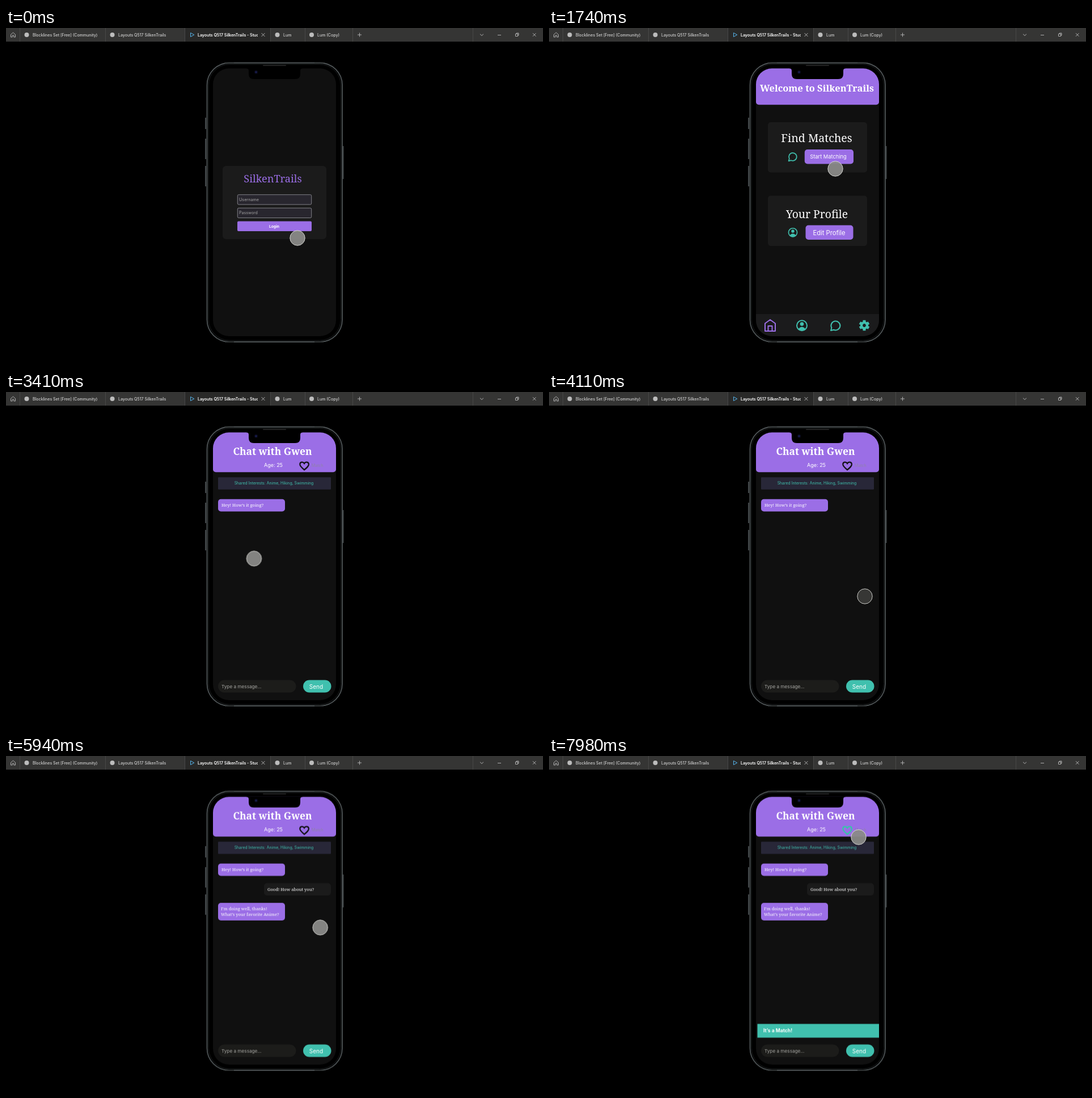
These frames come from a looping animation (947x592 px, 8 s). An HTML page:

```html
<!DOCTYPE html>
<html lang="en">
<head>
<meta charset="utf-8">
<title>Phone prototype</title>
<style>
  html, body { margin: 0; width: 100%; height: 100%; overflow: hidden; background: #000; }
  svg { display: block; width: 100vw; height: 100vh; }
  text { font-family: Inter, sans-serif; fill: #fff; }
  .serif { font-family: "Noto Serif", serif; }
  .bold { font-weight: 700; }
  .mid { text-anchor: middle; }
  .tab { font-size: 7px; font-weight: 500; fill: #d2d2d2; }
  .purple { fill: #9b6ee6; }
  .teal { fill: #40c0ae; }
  .card { fill: #1b1b1b; }
  .line { fill: none; stroke: #bcbcbc; stroke-width: .9; }
  .icon { fill: none; stroke: #40c0ae; stroke-width: 2; stroke-linejoin: round; }
</style>
</head>
<body>
<svg viewBox="0 0 947 592" preserveAspectRatio="none">
  <defs>
    <clipPath id="screenClip"><rect x="365" y="71.300" width="217" height="471.700" rx="28"/></clipPath>
    <clipPath id="tabClip"><rect x="330" y="0" width="114" height="24"/></clipPath>
    <g id="person">
      <circle r="9" class="icon"/>
      <circle cy="-2.700" r="3.300" class="teal"/>
      <path d="M-6.500 6Q0-1.400 6.500 6Q0 11-6.500 6Z" class="teal"/>
    </g>
    <path id="bubble" class="icon" d="M-8 8.500L-6.600 3.800A8 8 0 1 1-3 7.200Z"/>
  </defs>

  <rect width="947" height="592"/>

  <g id="bar">
    <rect width="947" height="24" fill="#353534"/>
    <rect x="316" width="150" height="24" fill="#292928"/>
    <path d="M24.500 0V24M175.500 0V24M315.500 0V24M466.500 0V24M527.500 0V24M611.500 0V24M823.500 0V24" stroke="#484848" fill="none"/>
    <path class="line" d="M8.500 11.500L12.500 8L16.500 11.500V16H13.800V13H11.200V16H8.500Z"/>
    <g fill="#bcbcbc">
      <circle cx="36.500" cy="12" r="4"/><circle cx="187.500" cy="12" r="4"/>
      <circle cx="478.500" cy="12" r="4"/><circle cx="539" cy="12" r="4"/>
    </g>
    <path d="M325.500 8.500L331.800 12L325.500 15.500Z" fill="none" stroke="#55b4ea"/>
    <text class="tab" x="47" y="14.500">Blocklines Set [Free] (Community)</text>
    <text class="tab" x="198" y="14.500">Layouts Q517 SilkenTrails</text>
    <g clip-path="url(#tabClip)">
      <text class="tab" x="338" y="14.500" style="fill:#fff;font-weight:600">Layouts Q517 SilkenTrails - Studio</text>
    </g>
    <text class="tab" x="489" y="14.500">Lum</text>
    <text class="tab" x="549" y="14.500">Lum (Copy)</text>
    <path class="line" d="M450.500 9L456.500 15M456.500 9L450.500 15M620 12H627M623.500 8.500V15.500M836 10.700L839 13.500L842 10.700M867 12.500H873M898.500 10.500H902.500V14.500H898.500ZM900 10V9H904V13H903M929 9.200L934.500 14.700M934.500 9.200L929 14.700"/>
  </g>

  <g id="phone">
    <path d="M352 158V178M352 195V231M352 243V279M594.500 208V266" stroke="#43494b" stroke-width="2"/>
    <rect x="354.500" y="61.500" width="238.500" height="491.500" rx="39" fill="#000" stroke="#4f5557" stroke-width="1.800"/>
    <rect x="357" y="64" width="233.500" height="486.500" rx="37" fill="none" stroke="#1d2021"/>
    <path d="M544 61.500H560M544 553H560M386 61.500H402M386 553H402" stroke="#343839" stroke-width="2"/>
    <g clip-path="url(#screenClip)">
      <rect x="365" y="71" width="217" height="472" fill="#101010"/>

      <g id="login">
        <rect class="card" x="382" y="243" width="183" height="129" rx="6"/>
        <text class="serif mid" x="470.500" y="272" font-size="18.200" style="fill:#9b6ee6">SilkenTrails</text>
        <g fill="#28262e" stroke="#8c8c92" stroke-width=".9">
          <rect x="408.300" y="293.700" width="130.400" height="17.300" rx="2"/>
          <rect x="408.300" y="317.200" width="130.400" height="17.300" rx="2"/>
        </g>
        <text x="411" y="304.700" font-size="7.200" style="fill:#a3a3a3">Username</text>
        <text x="411" y="328.300" font-size="7.100" style="fill:#a3a3a3">Password</text>
        <rect class="purple" x="408" y="340.500" width="131" height="17.500" rx="2"/>
        <text class="mid bold" x="473" y="352" font-size="6.700">Login</text>
      </g>

      <g id="home">
        <rect class="purple" x="365" y="60" width="217" height="75.300" rx="5"/>
        <text class="serif bold mid" x="472.500" y="112" font-size="16.400">Welcome to SilkenTrails</text>
        <rect class="card" x="386" y="166" width="175" height="88.500" rx="5"/>
        <text class="serif mid" x="472" y="201" font-size="19.600">Find Matches</text>
        <use href="#bubble" transform="translate(429.500 227) scale(.86)"/>
        <rect class="purple" x="450.800" y="214" width="86.200" height="25.500" rx="5"/>
        <text class="mid" x="492.500" y="230" font-size="9.300">Start Matching</text>
        <rect class="card" x="386" y="295.500" width="175" height="88.500" rx="5"/>
        <text class="serif mid" x="472.500" y="335" font-size="19.300">Your Profile</text>
        <use href="#person" transform="translate(430 360.300) scale(.84)"/>
        <rect class="purple" x="452.500" y="347.500" width="84" height="25.500" rx="5"/>
        <text class="mid" x="494" y="365" font-size="11.200">Edit Profile</text>
        <rect x="365" y="504" width="217" height="40" fill="#1b1b1c"/>
        <path class="icon" style="stroke:#9b6ee6" d="M381 520.500L390 514L399 520.500V534H381ZM386.500 534V525H393.500V534"/>
        <use href="#person" transform="translate(446 524.300)"/>
        <use href="#bubble" transform="translate(505 524.500)"/>
        <g transform="translate(556 524)">
          <circle r="5" fill="none" stroke="#40c0ae" stroke-width="4.200"/>
          <path d="M0-9.300V-6M0 9.300V6M-8-4.650L-5.200-3M8 4.650L5.200 3M-8 4.650L-5.200 3M8-4.650L5.200-3" stroke="#40c0ae" stroke-width="5"/>
        </g>
      </g>

      <g id="chat">
        <rect class="purple" x="365" y="60" width="217" height="81.300" rx="5"/>
        <text class="serif bold mid" x="470" y="111" font-size="17.400">Chat with Gwen</text>
        <text class="mid" x="471.500" y="132" font-size="9">Age: 25</text>
        <path id="heart" d="M526 137.200C521 133 518.300 130.500 518.300 127.600C518.300 123 524 122.200 526 126C528 122.200 533.900 123 533.900 127.600C533.900 130.500 531 133 526 137.200Z" fill="none" stroke="#141218" stroke-width="2.200"/>
        <text x="539" y="132.300" font-size="7" style="fill:#8f83a8">Match</text>
        <rect x="374" y="150.300" width="199" height="21.500" rx="1" fill="#282738"/>
        <text class="mid" x="472.500" y="163" font-size="6.900" style="fill:#40c0ae">Shared Interests: Anime, Hiking, Swimming</text>
        <rect class="purple" x="374" y="188.800" width="118" height="21.700" rx="5"/>
        <text class="serif" x="380" y="202" font-size="7.700">Hey! How’s it going?</text>
        <g id="reply">
          <rect class="card" x="455" y="223.300" width="118" height="21.700" rx="5"/>
          <text class="serif" x="461" y="236.600" font-size="7.600">Good! How about you?</text>
        </g>
        <g id="answer">
          <rect class="purple" x="374" y="258" width="118" height="31" rx="5"/>
          <text class="serif" x="379" y="271" font-size="7.500">I’m doing well, thanks!</text>
          <text class="serif" x="379" y="281.300" font-size="7.500">What’s your favorite Anime?</text>
        </g>
        <g id="match">
          <rect class="teal" x="367.500" y="471.300" width="215" height="24.200"/>
          <text class="bold" x="378" y="486" font-size="8.600">It’s a Match!</text>
        </g>
        <rect x="374" y="507.500" width="137.500" height="22" rx="11" fill="#1c1c1a"/>
        <text x="380" y="522" font-size="8.200" style="fill:#a6a6a2">Type a message...</text>
        <rect class="teal" x="524" y="507.500" width="49.500" height="22" rx="11"/>
        <text class="mid" x="547" y="522.700" font-size="10">Send</text>
      </g>
    </g>
    <path d="M424 70.500H523V71.300Q519 71.300 519 75.300V81Q519 90 510 90H437Q428 90 428 81V75.300Q428 71.300 424 71.300Z"/>
    <rect x="453" y="65" width="41" height="2" rx="1" fill="#202020"/>
    <circle cx="441" cy="77.700" r="3" fill="#0c0d24"/>
    <circle cx="441" cy="77.700" r="1.200" fill="#1d2460"/>
  </g>

  <circle id="cursor" r="13.200" fill="#8a8a88" fill-opacity=".95" stroke="#dededa" stroke-width=".9"/>
</svg>
<script>
const LOOP = 8000;
const HOME = 520, CHAT = 2230, REPLY = 4230, ANSWER = 5700, MATCH = 7500;

// Each row is [time, value]; the last value is held until the loop ends.
function play(id, property, rows, easing) {
  const frames = [...rows, [LOOP, rows.at(-1)[1]]].map(([time, value]) =>
    ({ offset: time / LOOP, [property]: value, easing }));
  document.getElementById(id).animate(frames, { duration: LOOP, iterations: Infinity }).startTime = 0;
}

const step = (id, property, rows) => play(id, property, rows, 'step-end');

function show(id, from, to = LOOP) {
  const rows = [[0, from ? 0 : 1]];
  if (from) rows.push([from, 1]);
  if (to < LOOP) rows.push([to, 0]);
  step(id, 'opacity', rows);
}

show('login', 0, HOME);
show('home', HOME, CHAT);
show('chat', CHAT);
show('reply', REPLY);
show('answer', ANSWER);
show('match', MATCH);
step('heart', 'stroke', [[0, '#141218'], [MATCH, '#34c8a8']]);
step('phone', 'transform', [[0, 'translate(0px, 0px)'], [REPLY, 'translate(0px, 0.7px)']]);

const path = [
  [0, 514, 370], [330, 508, 352], [700, 508, 352], [1600, 505, 250], [1740, 505, 248],
  [2000, 503, 231], [2350, 503, 231], [2910, 397, 271], [3150, 397, 271],
  [3900, 557, 360], [4250, 557, 360], [4840, 555, 328], [5600, 555, 322],
  [6810, 550, 202], [7300, 530, 133], [7600, 530, 133], [7980, 546, 143],
];
play('cursor', 'transform', path.map(([t, x, y]) => [t, `translate(${x}px, ${y}px)`]), 'ease-in-out');

const presses = [[340, 480], [2050, 2200], [4040, 4200], [7360, 7490]];
const pressed = (down, up) => [[0, up], ...presses.flatMap(([a, b]) => [[a, down], [b, up]])];
step('cursor', 'fill', pressed('#3a3a38', '#8a8a88'));
</script>
</body>
</html>
```
